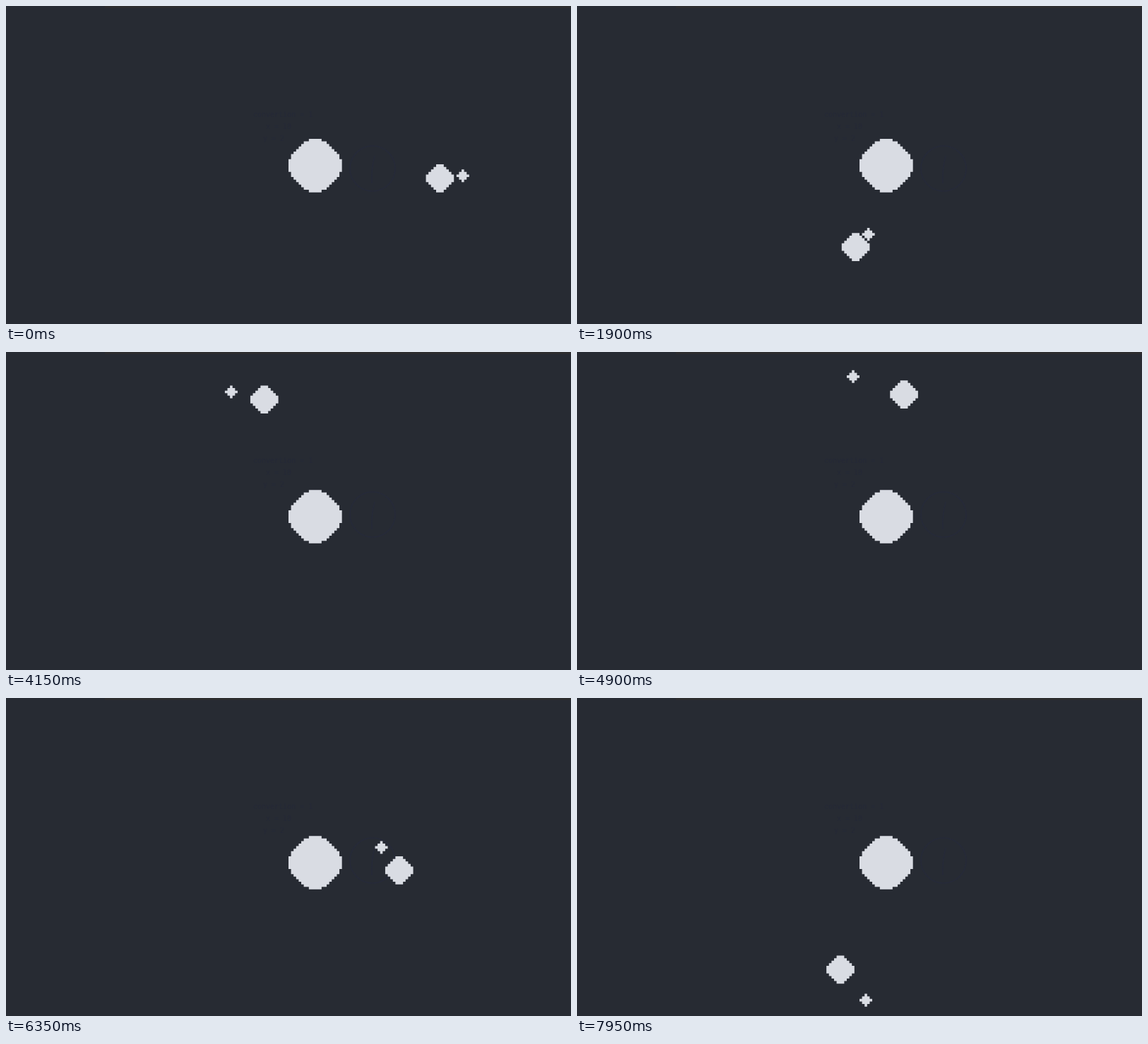
Recreate the animation shown at these times as an HTML page with a canvas. Size 800 by 450 pixels, loop 8000 ms.

```html
<!DOCTYPE html>
<html>
<head>
<meta charset="utf-8">
<style>
  html, body { margin: 0; width: 100%; height: 100%; overflow: hidden; background: #272b33; }
  canvas { display: block; width: 100vw; height: 100vh; }
</style>
</head>
<body>
<canvas id="stage" width="800" height="450"></canvas>
<script>
const ctx = document.getElementById('stage').getContext('2d');
const LOOP = 8, STEP = 0.05;          // seconds
const CELL = 800 / 222, TOP = 0.6;    // pixel grid
const FOCUS = { x: 438, y: 230 };

// Precessing orbits: the radius swings once per period, and the angle
// (degrees) runs ahead when near the centre and lags when far away.
const planetOrbit = {
  period: 4.47, farthest: 4.27,
  radius: 149, swing: 30, bulge: 5,
  startAngle: 7.2, turnRate: 57.2, lag: 15, lead: 2.8
};
const moonOrbit = {
  period: 4.43, farthest: 4.21,
  radius: 153, swing: 58, bulge: 22,
  startAngle: 8.1, turnRate: 54.35, lag: 27.5, lead: 5
};

function orbitAt(o, t) {
  const phase = 2 * Math.PI * (t - o.farthest) / o.period;
  const r = o.radius + o.swing * Math.cos(phase) + o.bulge * Math.sin(phase) ** 2;
  const degrees = o.startAngle + o.turnRate * t
    - o.lag * Math.sin(phase) + o.lead * Math.sin(2 * phase);
  const angle = degrees * Math.PI / 180;
  return { x: FOCUS.x + r * Math.cos(angle), y: FOCUS.y + r * Math.sin(angle) };
}

// The sun eases down a little as the others pull on it
const sunAt = t => ({ x: FOCUS.x, y: 229.5 + 4.5 * Math.tanh(t - 3.1) });

// A disc with cut corners on the pixel grid, filled as one path so rows join cleanly
function drawBody({ x, y }, radius, cut) {
  const col = Math.floor(x / CELL), row = Math.floor((y - TOP) / CELL);
  const limit = radius * radius + 4;
  ctx.beginPath();
  for (let dy = -radius; dy <= radius; dy++) {
    const round = Math.floor(Math.sqrt(limit - dy * dy));
    const half = Math.min(radius, round, cut - Math.abs(dy));
    ctx.rect((col - half) * CELL, (row + dy) * CELL + TOP, (2 * half + 1) * CELL, CELL);
  }
  ctx.fillStyle = '#d9dce3';
  ctx.fill();
}

function drawBackdrop() {
  ctx.fillStyle = '#272b33';
  ctx.fillRect(0, 0, 800, 450);
  ctx.fillStyle = '#2d2d2f';
  ctx.fillRect(140, 0, 660, 3);

  // Faint dial and text
  ctx.strokeStyle = '#262a39';
  ctx.lineWidth = 1.5;
  ctx.beginPath();
  ctx.arc(519, 230, 32, 0, 2 * Math.PI);
  ctx.moveTo(522, 212);
  ctx.quadraticCurveTo(517, 230, 518, 251);
  ctx.stroke();
  ctx.fillStyle = '#252937';
  ctx.font = '10px "DejaVu Sans Mono", monospace';
  ctx.fillText('convertion = 1', 350, 157);
  ctx.fillText('x = 10', 368, 174);
  ctx.fillText('y = 2', 364, 191);
}

function draw(t) {
  drawBackdrop();
  drawBody(sunAt(t), 10, 13);
  drawBody(orbitAt(planetOrbit, t), 5, 6);
  drawBody(orbitAt(moonOrbit, t), 2, 2);
}

const start = performance.now();
function frame() {
  const t = (performance.now() - start) / 1000 % LOOP;
  draw(Math.floor(t / STEP) * STEP);
  requestAnimationFrame(frame);
}
frame();
</script>
</body>
</html>
```
